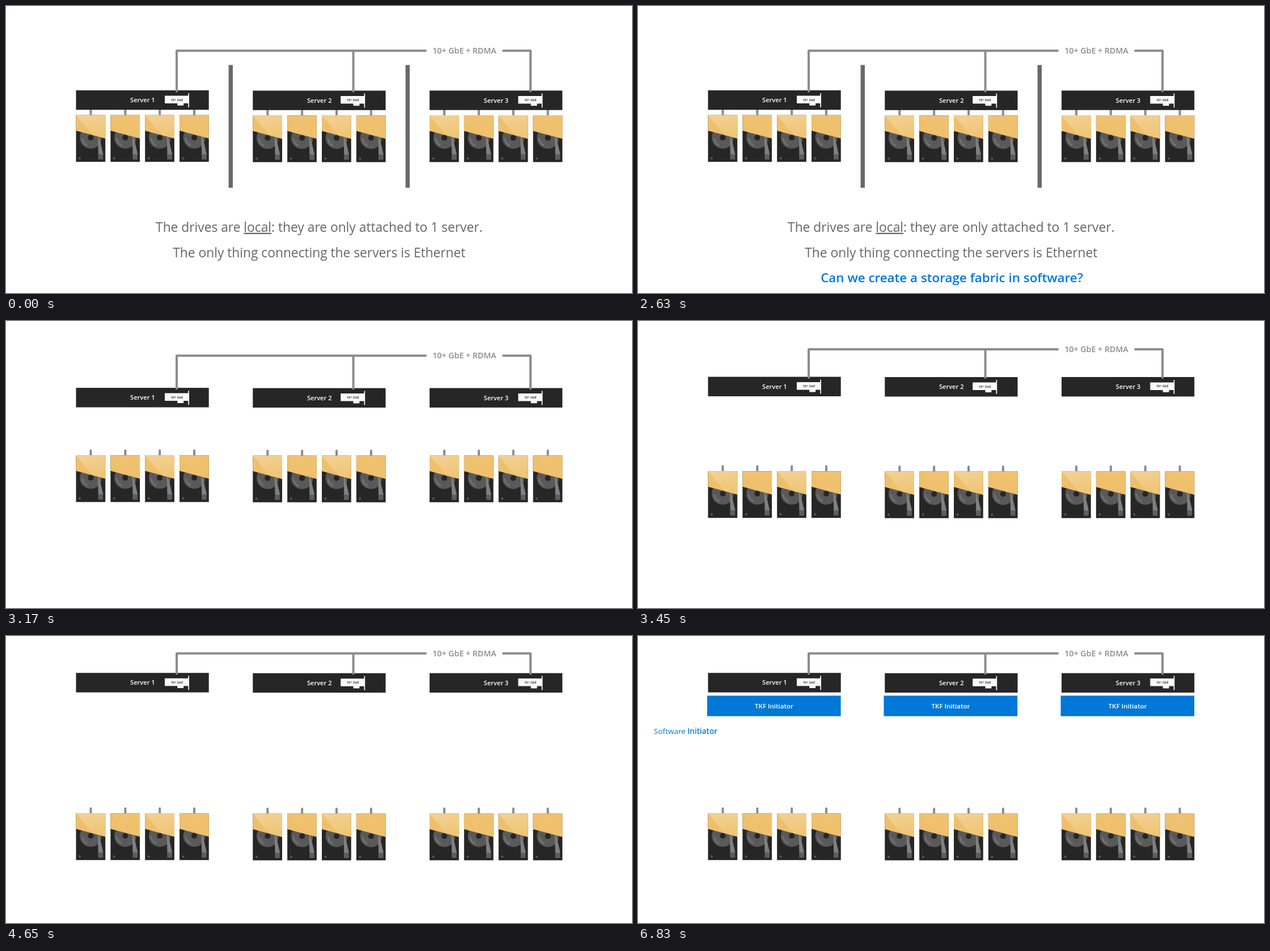
An HTML page that plays this animation: 1104x507 px, repeating every 8000 ms.

```html
<!DOCTYPE html>
<html lang="en">
<head>
<meta charset="utf-8">
<title>Storage fabric</title>
<style>
  html, body { margin: 0; width: 100%; height: 100%; overflow: hidden; background: #fff; }
  svg { display: block; width: 100%; height: 100%; }
  text { font-family: "Open Sans", "Noto Sans", sans-serif; }
  .semi { font-weight: 600; }
  .mid { text-anchor: middle; }
  .wire { fill: none; stroke: #8c8c8c; stroke-width: 4; stroke-linecap: round; stroke-linejoin: round; }
  .flat { stroke-linecap: butt; }
</style>
</head>
<body>
<svg viewBox="0 0 1104 507">
  <defs>
    <linearGradient id="sheen" x1="0" y1="0" x2="0.3" y2="1">
      <stop offset="0" stop-color="#f3d296"/>
      <stop offset="1" stop-color="#efc677"/>
    </linearGradient>
    <g id="drive">
      <path class="wire" d="M26 -8.5V2"/>
      <rect width="51.7" height="82.6" fill="#262626"/>
      <circle cx="26" cy="39.8" r="19.4" fill="#595959"/>
      <path d="M10.8 40.5A15.2 15.2 0 0 0 20 53.8" fill="none" stroke="#8c8c8c" stroke-width="1.2"/>
      <path d="M14.5 43A12 12 0 0 0 21 50.7" fill="none" stroke="#707070" stroke-width=".8"/>
      <circle cx="26" cy="39.8" r="5.1" fill="#262626"/>
      <path d="M38.5 40L40.7 37.5L48 69.5H39.2Z" fill="#808080"/>
      <rect x="39" y="69.5" width="8.6" height="9" fill="#5e5e5e"/>
      <circle cx="6.5" cy="76.2" r="2" fill="#595959"/>
      <path d="M0 0H51.7V41.3L0 27.6Z" fill="#efc06c"/>
    </g>
    <path id="shine" d="M0 0H51.7V41.3L29.5 35.4Z" fill="url(#sheen)"/>
    <g id="card" fill="#f9f9f9">
      <path d="M0 9.5H41.3V5H43V30H41.3V23H33.2V26.8H22.3V23H0Z"/>
    </g>
  </defs>
  <g id="drives"></g>
  <g id="servers"></g>
  <path id="bus" class="wire"/>
  <path id="busTail" class="wire"/>
  <text id="busLabel" class="semi mid" x="808.5" y="84.2" font-size="14.2" fill="#8c8c8c">10+ GbE + RDMA</text>
  <g id="intro">
    <path d="M392.6 104.2h7.4v216.8h-7.4zM704.6 104.2h7.4v216.8h-7.4z" fill="#696969"/>
    <g class="mid" font-size="22.75" fill="#666">
      <text x="552.3" y="398.7">The drives are <tspan text-decoration="underline">local</tspan>: they are only attached to 1 server.</text>
      <text x="552.3" y="444">The only thing connecting the servers is Ethernet</text>
    </g>
    <text id="question" class="semi mid" x="553.5" y="487.8" font-size="22.4" fill="#0078d7">Can we create a storage fabric in software?</text>
  </g>
  <g id="layers"></g>
  <text id="note" x="28" y="173" font-size="13.5" fill="#0078d7">Software <tspan class="semi">Initiator</tspan></text>
</svg>
<script>
const LOOP = 8000;
const MOVE_START = 2630, STEP = 67.3, MOVE_STEPS = 30;
const FADE = 470;
const BAR_TOP = 149.4, DRIVE_TOP = 193.1, BUS_Y = 79;

const servers = [
  { x: 123.5, dy: -0.4, card: 280, port: 301, layer: 122, shown: 5970 },
  { x: 435.3, dy: 0.1, card: 590.2, port: 612.5, layer: 433.5, shown: 6170 },
  { x: 747, dy: 0, card: 903.3, port: 925, layer: 745.5, shown: 6440 }
];

const el = id => document.getElementById(id);

const serverMarkup = (s, i) => `<g transform="translate(0 ${BAR_TOP + s.dy})">
  <rect x="${s.x}" width="234.2" height="34.4" fill="#262626"/>
  <text class="semi mid" x="${s.x + 117.4}" y="21.3" font-size="11.1" fill="#fff">Server ${i + 1}</text>
  <use href="#card" x="${s.card}"/>
  <text class="mid" x="${s.card + 21.5}" y="18.5" font-size="5.6" font-weight="700" fill="#444">10+ GbE</text>
</g>`;

const driveMarkup = s => [0, 1, 2, 3].map(k =>
  `<g transform="translate(${s.x + k * 60.85} ${DRIVE_TOP + s.dy})">
    <use href="#drive"/><use href="#shine" opacity="${k % 2 ? 0.12 : 1}"/>
  </g>`).join("");

const layerMarkup = s => `<g>
  <rect x="${s.layer}" y="105.4" width="235.6" height="36.2" fill="#0078d7"/>
  <text class="semi mid" x="${s.layer + 118}" y="127.8" font-size="11.5" fill="#fff">TKF Initiator</text>
</g>`;

el("servers").innerHTML = servers.map(serverMarkup).join("");
el("drives").innerHTML = servers.map(driveMarkup).join("");
el("layers").innerHTML = servers.map(layerMarkup).join("");
const layers = [...el("layers").children];

// Short acceleration, then a long slow-down.
function glide(ms) {
  const turn = 388, end = 1966;
  const slow = t => 1 - Math.pow((end - t) / 1760, 2.2);
  if (ms <= 0) return 0;
  if (ms >= end) return 1;
  return ms < turn ? slow(turn) * (ms / turn) ** 2 : slow(ms);
}

function show(node, on) {
  node.setAttribute("visibility", on ? "visible" : "hidden");
}

function shift(id, dy) {
  el(id).setAttribute("transform", `translate(0 ${dy.toFixed(2)})`);
}

function render(t) {
  const n = Math.floor((t - MOVE_START) / STEP + 0.12);
  const ms = Math.max(0, Math.min(MOVE_STEPS, n)) * STEP;
  const p = glide(ms);
  const rise = -83.8 * p;
  const y = BUS_Y - 48.2 * p;
  const foot = BAR_TOP + rise + 1;
  const [a, b, c] = servers.map(s => s.port);

  shift("servers", rise);
  shift("drives", 120.5 * p);
  shift("busLabel", y - BUS_Y);
  el("bus").setAttribute("d", `M${a} ${foot}V${y}H740M${b} ${y}V${foot}`);
  el("busTail").setAttribute("d", `M877 ${y}H${c}V${foot}`);

  const fade = Math.max(0, 1 - ms / FADE);
  el("intro").setAttribute("opacity", fade);
  show(el("intro"), fade > 0);
  el("question").setAttribute("display", t >= 500 ? "inline" : "none");

  layers.forEach((g, i) => show(g, t >= servers[i].shown));
  show(el("note"), t >= 6830);
}

const start = performance.now();
function tick() {
  render((performance.now() - start) % LOOP);
  requestAnimationFrame(tick);
}
tick();
</script>
</body>
</html>
```
